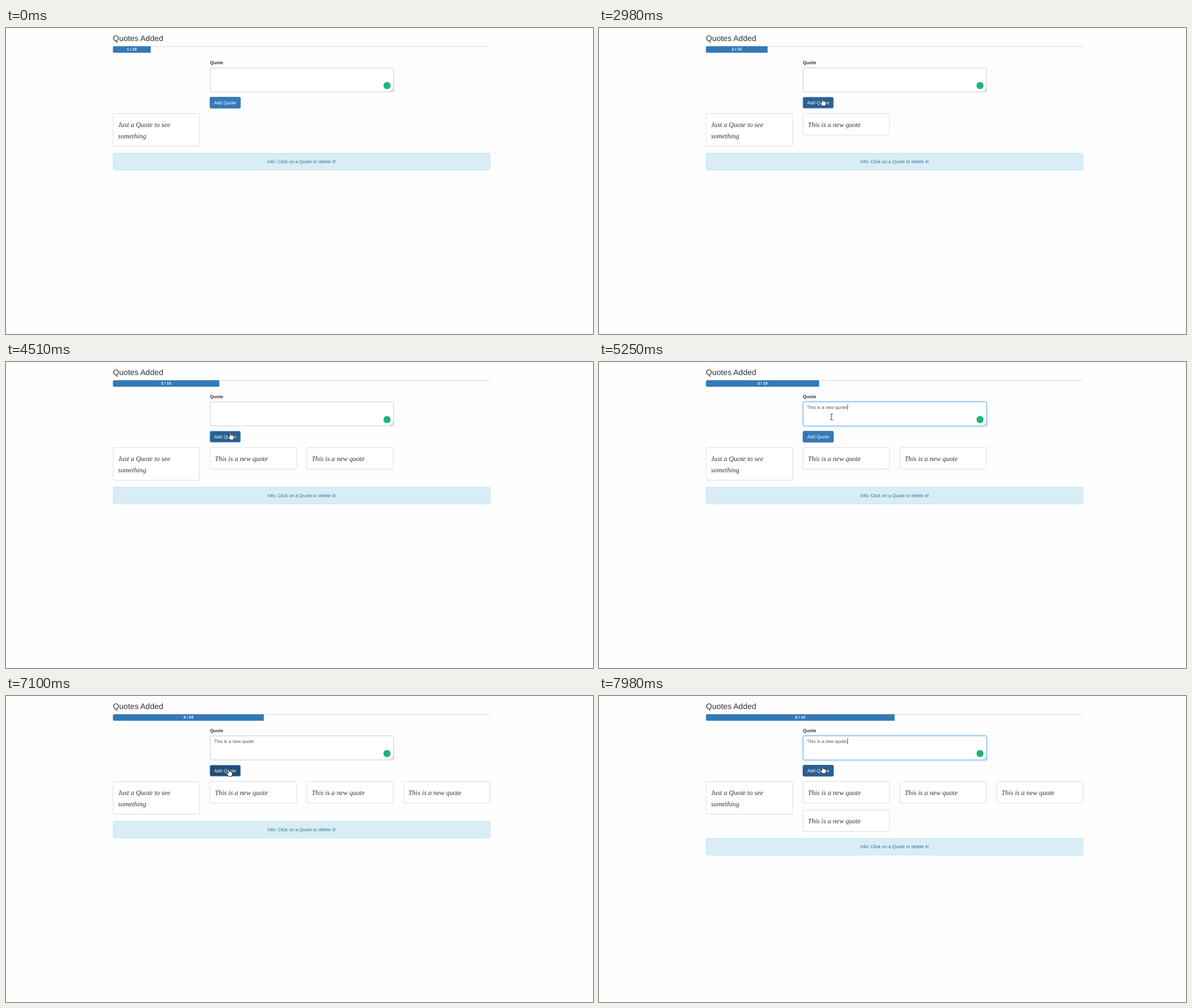
An HTML page that plays this animation: 1035 by 541 pixels, repeating every 8000 ms.

```html
<!DOCTYPE html>
<html lang="en">
<head>
<meta charset="utf-8">
<title>Quotes Added</title>
<style>
  html, body { margin: 0; width: 100%; height: 100%; overflow: hidden; background: #fefefe; }
  svg { display: block; width: 1035px; height: 541px; }
  text { font: 8.17px "Liberation Sans", Arial, sans-serif; fill: #333; text-rendering: geometricPrecision; }
  .mid { text-anchor: middle; }
  .bold { font-weight: bold; }
  .card rect { fill: #fff; stroke: #ddd; }
  .card text { font: italic 12.1px "Liberation Serif", Times, serif; fill: #333; }
  #field { fill: #fff; stroke: #ccc; }
  #field.focus { stroke: #66afe9; filter: drop-shadow(0 0 2px rgba(102, 175, 233, .6)); }
  #pointer path { fill: #fff; stroke: #111; stroke-width: .9; stroke-linejoin: round; }
  #pointer #beam { fill: none; stroke: #333; stroke-width: 1; }
</style>
</head>
<body>
<svg viewBox="0 0 1035 541">
  <text x="188.5" y="23.3" style="font-size:14px">Quotes Added</text>
  <path d="M190 32.5H853" stroke="#dedede"/>
  <path d="M853.5 33V42" stroke="#eee"/>
  <path id="bar" fill="#337ab7"/>
  <text id="count" class="mid bold" y="40.4" style="font-size:7px;fill:#fff"></text>

  <text class="bold" x="359.4" y="64.3">Quote</text>
  <rect id="field" x="360" y="70.5" width="323.5" height="42.5" rx="2"/>
  <text id="typed" x="366.6" y="83" style="fill:#555">This is a new quote</text>
  <path id="caret" stroke="#222" stroke-width=".9"/>
  <circle cx="671.8" cy="101.7" r="6.3" fill="#1fb573"/>
  <path d="M678 112L683 107M681 112L683 110" stroke="#888" stroke-width=".7"/>

  <rect id="button" x="359.8" y="122.3" width="53.4" height="19.5" rx="2"/>
  <text class="mid" x="386.4" y="135" style="fill:#fff">Add Quote</text>

  <g id="cards"></g>

  <g id="info">
    <rect x="189" y="221.3" width="664.6" height="29.6" rx="2" fill="#d9edf7" stroke="#bce8f1"/>
    <text class="mid" x="521.2" y="239" style="fill:#31708f">Info: Click on a Quote to delete it!</text>
  </g>

  <g id="pointer">
    <path id="arrow" d="M0 0V10L2.3 7.9L4 11.6L5.7 10.9L4.1 7.3H7.2Z"/>
    <path id="beam" d="M-2.5 -5H-.7L0 -4.4L.7 -5H2.5M0 -4.4V4.4M-2.5 5H-.7L0 4.4L.7 5H2.5"/>
    <path id="hand" d="M-1 .8Q0 -.6 1 .8V4.6Q2.3 3.9 3 5Q4.3 4.4 4.9 5.6Q6.6 5.3 6.6 7V9.6L5.4 13H-.4L-3.6 8.4Q-3.9 6.6 -2.2 7L-1 8.2Z"/>
  </g>
</svg>
<script>
const LOOP = 8000, LEFT = 188.5, FULL = 665.3, PITCH = 170.7, PRESS = 110, BAR_TIME = 600;
const focusTimes = [980, 3420, 4950, 6350, 7750];
const pasteTimes = [1880, 3560, 5250, 6640, 7860];
const addTimes = [2760, 4200, 5770, 7180];

// time, x, y of the pointer's hot spot
const route = [
  [140, 853, 472], [660, 401, 90], [1880, 401, 90], [2350, 393, 128], [2900, 393, 128],
  [3340, 401, 92], [3600, 401, 92], [3780, 398.6, 121], [3940, 393, 129], [4400, 393, 129],
  [4880, 410, 97], [5250, 410, 97], [5600, 392, 129], [5850, 392, 129], [6200, 401, 91.7],
  [6660, 401, 91.7], [6960, 392.6, 129], [7260, 392.6, 129], [7600, 401, 92],
  [7860, 401, 92], [7980, 394, 124]
];

const $ = id => document.getElementById(id);
const show = (node, on) => node.style.display = on ? '' : 'none';
const last = (times, t) => times.filter(v => v <= t).pop() ?? -Infinity;
const smooth = p => p * p * (3 - 2 * p);

// CSS "ease": cubic-bezier(.25, .1, .25, 1)
function ease(p) {
  if (p >= 1) return 1;
  let lo = 0, hi = 1, u;
  for (let i = 0; i < 20; i++) {
    u = (lo + hi) / 2;
    const x = .75 * u * (1 - u) + u ** 3;
    if (x < p) lo = u; else hi = u;
  }
  return .3 * u * (1 - u) ** 2 + 3 * u * u * (1 - u) + u ** 3;
}

function addCard(column, y, height, lines) {
  const x = LEFT + PITCH * column;
  const texts = lines.map((s, i) => `<text x="${x + 9}" y="${y + 24 + 20 * i}">${s}</text>`).join('');
  $('cards').insertAdjacentHTML('beforeend',
    `<g class="card"><rect x="${x + .5}" y="${y + .5}" width="152.5" height="${height}" rx="2"/>${texts}</g>`);
}
addCard(0, 150.8, 57.7, ['Just a Quote to see', 'something']);
for (const [column, y] of [[1, 150.8], [2, 150.8], [3, 150.8], [1, 201]])
  addCard(column, y, 38, ['This is a new quote']);

function pointerAt(t) {
  const i = route.findIndex(k => k[0] > t);
  if (i < 0) return route.at(-1).slice(1);
  if (!i) return null;
  const [t0, x0, y0] = route[i - 1], [t1, x1, y1] = route[i];
  const p = smooth((t - t0) / (t1 - t0));
  return [x0 + (x1 - x0) * p, y0 + (y1 - y0) * p];
}

function drawPointer(t) {
  const at = pointerAt(t);
  show($('pointer'), at);
  if (!at) return false;
  const [x, y] = at, inside = x > 359 && x < 684 && y > 70 && y < 113;
  const hover = x > 359 && x < 413 && y > 122 && y < 142;
  $('pointer').setAttribute('transform', `translate(${x} ${y})`);
  show($('beam'), inside);
  show($('hand'), hover);
  show($('arrow'), !inside && !hover);
  return hover;
}

function draw(t) {
  const added = addTimes.filter(v => v <= t).length, count = added + 1;
  const sinceAdd = t - last(addTimes, t);
  const width = FULL / 10 * (added + (added ? ease(sinceAdd / BAR_TIME) : 1));
  $('bar').setAttribute('d', `M${LEFT + width} 32.2V43.8H190.8Q188.5 43.8 188.5 41.5V34.5Q188.5 32.2 190.8 32.2Z`);
  $('count').textContent = `${count} / 10`;
  $('count').setAttribute('x', LEFT + width / 2);
  [...$('cards').children].forEach((card, i) => show(card, i < count));
  $('info').setAttribute('transform', `translate(0 ${count > 4 ? 30.3 : 0})`);

  const focused = last(focusTimes, t), pasted = last(pasteTimes, t);
  const pressed = last(addTimes.map(v => v - PRESS), t);
  const editing = focused > pressed, filled = pasted > last(addTimes, t);
  $('field').classList.toggle('focus', editing);
  show($('typed'), filled);
  const blink = (t - Math.max(focused, pasted)) % 1020 < 510;
  show($('caret'), editing && blink);
  $('caret').setAttribute('d', `M${filled ? 438.3 : 367.5} 75.2V84.8`);

  const hover = drawPointer(t), buttonFocus = pressed > focused;
  const down = buttonFocus && t - pressed < PRESS;
  const fill = down ? '#204d74' : hover || buttonFocus ? '#286090' : '#337ab7';
  $('button').setAttribute('fill', fill);
  $('button').setAttribute('stroke', buttonFocus ? '#5b93d6' : hover ? '#204d74' : '#2e6da4');
}

function tick() {
  draw(performance.now() % LOOP);
  requestAnimationFrame(tick);
}
tick();
</script>
</body>
</html>
```
